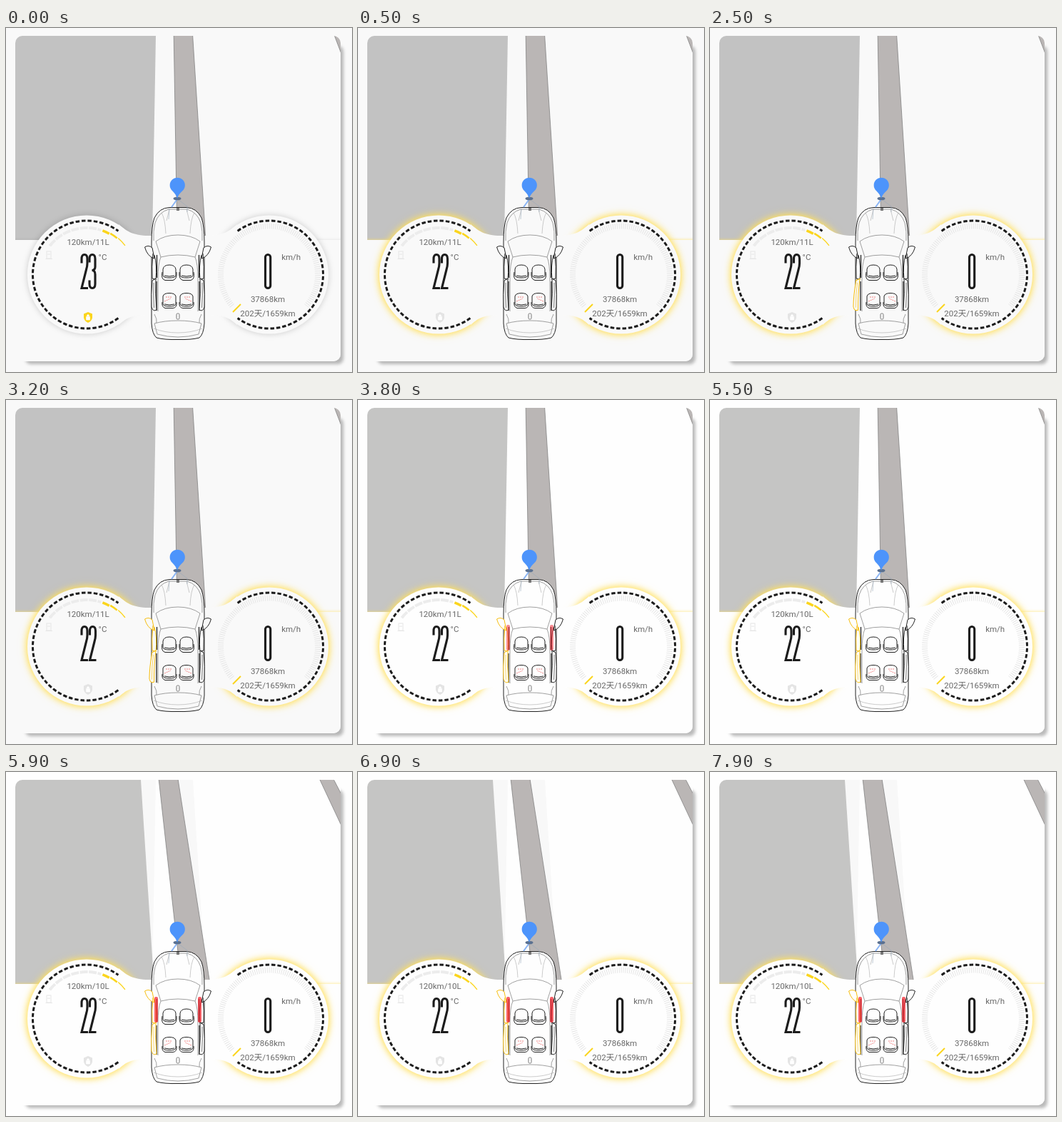
An HTML page that plays this animation: 485x482 px, repeating every 8 s.

```html
<!DOCTYPE html>
<html lang="zh">
<head>
<meta charset="utf-8">
<style>
html, body { margin: 0; width: 100%; height: 100%; overflow: hidden; background: var(--bg); }
svg { display: block; width: 485px; height: 482px; fill: none; --ink: #222; }
text { font: 11.5px Roboto, "Noto Sans CJK SC", "Noto Sans CJK", sans-serif; fill: #686868; text-anchor: middle; }
.bg { fill: var(--bg); }
.shade { fill: #0004; filter: blur(2px); }
.panel { filter: drop-shadow(0 0 2px var(--glow)); }
.gauges { filter: drop-shadow(0 0 4px var(--glow)) drop-shadow(0 0 5px var(--glow)); }
.land { fill: var(--land); }
.road { fill: #bab6b5; stroke: #777; stroke-width: .7; }
.ghost { fill: #f8f8f8; }
.digits { stroke: #1c1c1c; stroke-width: 3.1; }
.car { stroke: var(--ink); stroke-width: 1; }
.thin { stroke: #777; stroke-width: .7; }
.faint { stroke: #aaa; stroke-width: .6; }
</style>
</head>
<body>
<svg viewBox="0 0 485 482">
  <defs>
    <clipPath id="cardClip"><rect x="13" y="11" width="456" height="456" rx="10"/></clipPath>
    <g id="front">
      <path class="bg" d="M208 323Q198 320 194.500 307Q200 303.500 205 308Z"/>
      <path d="M206 316Q204 335 205 351L210 352Q212 333 208 318"/>
    </g>
    <g id="rear">
      <path class="bg" d="M210 351L205 354Q203 374 204 391Q206 398 211 395Q209 372 210 351Z"/>
      <path d="M207 357Q206 374 207.500 392" stroke-width=".6"/>
    </g>
    <g id="seat">
      <path d="M220 347V338Q221 332 229 332Q237 332 238 338V347Q237 350 229 350Q221 350 220 347Z"/>
      <path d="M219 342Q217 352 223 353.500H234Q240 352 239 342M222 347Q229 349 236 347"/>
    </g>
    <g id="backSeat">
      <path d="M220 387V376Q221 371.500 229 371.500Q237 371.500 238 376V387Q237 390 229 390Q221 390 220 387Z"/>
      <path d="M219 384Q218 391 223 392.500H234Q240 392 239 384M222 387Q229 389 236 387"/>
      <path d="M222 383L231 379M224 377H233" stroke="#e66" stroke-width=".8" stroke-dasharray="2 1"/>
    </g>
    <g id="half">
      <path d="M241 251.500H229Q215 252 208 266Q204 277 204 300V414Q205 429 211 434Q222 437 241 436.500"/>
      <path class="thin" d="M241 254H228Q214 258 209 273Q206 285 207 298M241 290Q222 290 210 299L217 321Q228 318 241 318M217 321Q213 330 213 352V397M208 401Q212 408 211 413M241 410Q222 410 208 414L212 429Q226 433 241 433"/>
      <path class="faint" d="M229 254L225 270M218 259Q223 267 224 288M207 421Q222 427 241 427"/>
      <path d="M211.500 318V350M211 355V396" stroke-width="1.300"/>
      <use href="#seat"/>
      <use href="#backSeat"/>
    </g>
  </defs>

  <rect class="shade" x="27" y="25" width="446" height="446" rx="8"/>
  <rect class="bg" x="13" y="11" width="456" height="456" rx="10"/>
  <g clip-path="url(#cardClip)">
    <g id="mapA">
      <path class="land" d="M13 11H210L205 297H13Z"/>
      <path class="road" d="M235 0H261L280 297H240ZM460.500 11L470 36V0Z"/>
    </g>
    <g id="mapB">
      <path class="ghost" d="M189 11H210L205 297H190ZM234 11H262L280 297H240Z"/>
      <path class="land" d="M13 11H189L207.500 297H13Z"/>
      <path class="road" d="M213 0H239.500L286 297H246ZM440 11L470 75V31L457 6Z"/>
    </g>
    <rect class="panel bg" x="5" y="297" width="472" height="180"/>
  </g>

  <g class="gauges bg">
    <circle cx="113" cy="345.500" r="83"/>
    <circle cx="369" cy="345.500" r="83"/>
  </g>
  <path class="bg" d="M158 275C168 284 178 291 200 291H282C304 291 314 284 324 275V416C314 406 304 402 282 402H200C178 402 168 406 158 416Z"/>
  <g id="dials"></g>

  <rect x="57" y="313" width="6" height="10" stroke="#e6e6e6"/>
  <path d="M55.500 323.500H65M58 317H62" stroke="#e6e6e6"/>
  <path id="shield" d="M115 398L121 400.500V406Q120 411 115 413Q110 411 109 406V400.500Z"/>
  <path d="M112.500 404.500H117.500V409H112.500ZM113.500 404V402.500Q115 400.500 116.500 402.500V404" fill="#fff" stroke="#fff" stroke-width=".6"/>

  <text id="fuel" x="115" y="304"></text>
  <text x="135.500" y="325">°C</text>
  <text x="399.700" y="325">km/h</text>
  <text x="367" y="384">37868km</text>
  <text x="367" y="404">202天/1659km</text>
  <g class="digits">
    <path id="tens" transform="translate(105.500 317.500)"/>
    <path id="ones" transform="translate(117 317.500)"/>
    <rect x="363.500" y="317.500" width="7.200" height="47" rx="3.600"/>
  </g>

  <path class="bg" d="M229 251.500H253Q267 252 274 266Q278 277 278 300V414Q277 429 271 434Q241 439 211 434Q205 429 204 414V300Q204 277 208 266Q215 252 229 251.500Z"/>
  <g class="car">
    <use href="#half"/>
    <g transform="matrix(-1 0 0 1 482 0)"><use href="#half"/><use href="#front"/><use href="#rear"/></g>
    <rect x="239" y="400" width="4" height="8" rx="1.500" stroke="#777"/>
    <use id="frontDoor" href="#front"/>
    <use id="rearDoor" href="#rear"/>
  </g>
  <g id="heat" fill="#f5303a"><rect x="208" y="315" width="5" height="36" rx="2"/><rect x="269" y="315" width="5" height="36" rx="2"/></g>
  <rect x="239" y="252" width="4" height="4" fill="#777"/>

  <path d="M240 240L232 251" stroke="#8ab4f4" stroke-width="2"/>
  <path d="M241 240L254 250V258M229 253L228 268" stroke="#9ab" stroke-width=".6"/>
  <ellipse cx="240" cy="239" rx="5.500" ry="2.300" fill="#5b7190"/>
  <path d="M240 239Q239 234 233 228A10.600 10.600 0 1 1 247.500 228Q241 234 240 239Z" fill="#4d94fb"/>
</svg>
<script>
const $ = id => document.getElementById(id);
const TWO = 'M0.500 12V6Q0.500 0 4.500 0T8.500 6V12Q8.500 16 7 21L0.500 47H9.500';
const THREE = 'M0 11V6Q0 0 4 0T8 6V17Q8 22 3.500 22Q8 22 8 28V41Q8 47 4 47T0 41V36';
const YELLOW = '#fbd51d', AMBER = '#f7bd0c';

// Clockwise arc; angles in degrees from the x axis
function arc(cx, r, from, to, color, width, dash = 'none') {
  const point = a => `${cx + r * Math.cos(a * Math.PI / 180)} ${345.5 + r * Math.sin(a * Math.PI / 180)}`;
  return `<path d="M${point(from)}A${r} ${r} 0 ${+(to - from > 180)} 1 ${point(to)}"
    stroke="${color}" stroke-width="${width}" stroke-dasharray="${dash}"/>`;
}
$('dials').innerHTML =
  arc(113, 75.5, 54, 306, '#1c1c1c', 3, '5.5 2.9') +
  arc(369, 75.5, -126, 126, '#1c1c1c', 3, '5.5 2.9') +
  arc(113, 65.5, 218, 288, '#ececec', 4, '11 1.5') +
  arc(113, 65.5, 290, 299, YELLOW, 3.5) +
  arc(113, 66.5, 300, 310, YELLOW, 2.6) +
  arc(113, 67.5, 311, 323, YELLOW, 1.4) +
  arc(369, 68, 140, 400, '#e6e6e6', 8, '1 1.9') +
  `<path d="M318 398L329 387" stroke="${YELLOW}" stroke-width="2"/>`;
$('tens').setAttribute('d', TWO);

function draw(ms) {
  const t = Math.floor(ms % 8000 / 100) * 100;
  const on = t >= 500, bright = t >= 3400, turned = t >= 5700;
  const style = document.documentElement.style;
  style.setProperty('--bg', bright ? '#fefefe' : '#f9f9f9');
  style.setProperty('--land', bright ? '#c5c5c4' : '#c2c2c2');
  style.setProperty('--glow', on ? '#ffe05ccc' : '#00000018');
  $('ones').setAttribute('d', on ? TWO : THREE);
  $('shield').setAttribute('fill', on ? '#e4e4e4' : YELLOW);
  $('fuel').textContent = t < 4500 ? '120km/11L' : '120km/10L';
  $('mapA').style.display = turned ? 'none' : '';
  $('mapB').style.display = turned ? '' : 'none';

  const swing = t >= 2500 && t < 3300 ? 38 * Math.sin((t - 2400) / 900 * Math.PI) ** 2 : 0;
  $('rearDoor').setAttribute('transform', `rotate(${swing} 209 351)`);
  $('rearDoor').style.stroke = t >= 2500 ? AMBER : '';
  $('frontDoor').style.stroke = t >= 2900 ? AMBER : '';
  $('heat').style.opacity = t >= 3500 ? .42 * (1 - Math.cos((t - 3500) / 500 * Math.PI)) : 0;
}

const start = performance.now();
function loop() {
  draw(performance.now() - start);
  requestAnimationFrame(loop);
}
loop();
</script>
</body>
</html>
```
